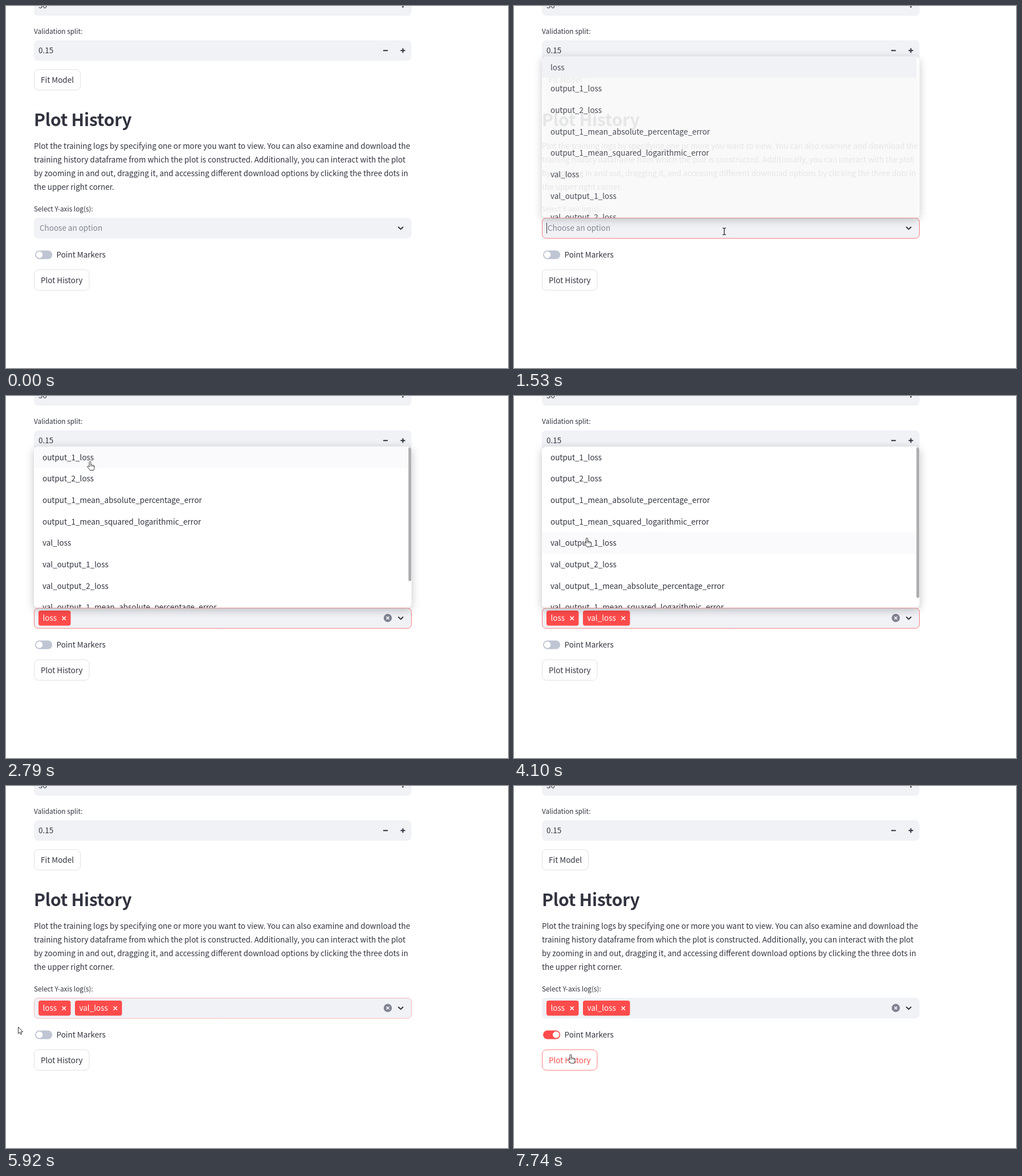
An HTML page with a canvas for the animation above (8000 ms loop, 881 by 636 pixels).

```html
<!DOCTYPE html>
<html lang="en">
<head>
<meta charset="utf-8">
<title>Plot History</title>
<style>
  html, body { margin: 0; width: 100%; height: 100%; overflow: hidden; background: #fff; }
  canvas { display: block; }
</style>
</head>
<body>
<canvas id="stage" width="881" height="636"></canvas>
<script>
const ctx = document.getElementById("stage").getContext("2d");
const LOOP = 8000;
const FAMILY = '"Noto Sans CJK SC", "Noto Sans CJK JP", "Noto Sans CJK", "Noto Sans", sans-serif';
const BODY = 13.48, LABEL = 11.8;
const INK = "#31333f", RED = "#ff4b4b", FIELD = "#f0f2f6", HOVER = "#fafafc";
const PANEL = { x: 49, y: 88.7, w: 662.7, h: 283.5, row: 37.65 };
const OPTIONS = ["loss", "output_1_loss", "output_2_loss",
  "output_1_mean_absolute_percentage_error", "output_1_mean_squared_logarithmic_error",
  "val_loss", "val_output_1_loss", "val_output_2_loss",
  "val_output_1_mean_absolute_percentage_error", "val_output_1_mean_squared_logarithmic_error"];
const INTRO = [
  "Plot the training logs by specifying one or more you want to view. You can also examine and download the",
  "training history dataframe from which the plot is constructed. Additionally, you can interact with the plot",
  "by zooming in and out, dragging it, and accessing different download options by clicking the three dots in",
  "the upper right corner."];

// Pointer moves: start, end, from x, from y, to x, to y
const MOVES = [
  [190, 990, 819, 624, 415, 424],
  [990, 1270, 415, 424, 369, 396],
  [1560, 2270, 369, 396, 147, 113],
  [2470, 2790, 147, 113, 147.5, 115.5],
  [3000, 3760, 147.5, 115.5, 128, 250],
  [4430, 4560, 128, 250, 128, 268],
  [4770, 5580, 128, 268, 21, 423],
  [6070, 6460, 21, 423, 74.5, 438.5],
  [7270, 7740, 74.5, 438.5, 99.5, 472]];
const PRESSES = [[1330, 1470], [2330, 2470], [3960, 4100], [5850, 5920], [6660, 6800]];

const HAND = new Path2D("M-1.4 9V1Q-1.4-.5 0-.5Q1.4-.5 1.4 1V6Q2.8 4.8 3.9 6.3Q5.4 5.2 6 6.8Q7.6 6.2 7.6 8.2V11Q7.4 13 6.3 15H0Q-1.5 12.5-4.2 9.8Q-5.4 8-4 7.6Q-2.6 7.6-1.4 9Z");
const ARROW = new Path2D("M.5.5V12L3.2 9.6L5 13.6L6.8 12.8L5.1 8.9H8.6Z");
const IBEAM = new Path2D("M-3-6Q-.3-6 0-5Q.3-6 3-6M0-5V5M-3 6Q-.3 6 0 5Q.3 6 3 6");

const clamp = v => Math.max(0, Math.min(1, v));
const ramp = (t, a, b) => clamp((t - a) / (b - a));
const between = (t, a, b) => t >= a && t < b;

function text(str, x, y, color = INK, size = BODY, weight = 400) {
  ctx.font = `${weight} ${size}px ${FAMILY}`;
  ctx.fillStyle = color;
  ctx.fillText(str, x, y);
}

function box(x, y, w, h, r, fill, border) {
  ctx.beginPath();
  ctx.roundRect(x, y, w, h, r);
  if (fill) { ctx.fillStyle = fill; ctx.fill(); }
  if (border) { ctx.strokeStyle = border; ctx.lineWidth = 1; ctx.stroke(); }
}

function disc(x, y, r, fill) {
  ctx.beginPath();
  ctx.arc(x, y, r, 0, Math.PI * 2);
  ctx.fillStyle = fill;
  ctx.fill();
}

function lines(path, color, width) {
  ctx.strokeStyle = color;
  ctx.lineWidth = width;
  ctx.stroke(new Path2D(path));
}

const cross = (x, y, r, color, width) =>
  lines(`M${x - r} ${y - r}l${2 * r} ${2 * r}m0 ${-2 * r}l${-2 * r} ${2 * r}`, color, width);

function numberField(value, cy) {
  box(49, cy - 18, 662.5, 36, 7.5, FIELD);
  text(value, 57, cy + 5.2);
  lines(`M662 ${cy}h8M692.5 ${cy}h8m-4 -4v8`, INK, 2);
}

function button(label, y, w, hot) {
  box(49.5, y, w, 36, 7.5, "#fff", hot ? "#ff8080" : "#e0e1e5");
  text(label, 61, y + 23.3, hot ? RED : INK);
}

function tag(label, x, w) {
  box(x, 377, w, 26.5, 4, RED);
  text(label, x + 7.5, 395.2, "#fff");
  cross(x + w - 11.7, 390.5, 3.2, "#fff", 1.6);
}

function pointerAt(t) {
  let pos = { x: 0, y: 0 };
  for (const [start, end, x0, y0, x1, y1] of MOVES) {
    if (t < start) break;
    const left = 1 - ramp(t, start, end), p = 1 - left * left;
    pos = { x: x0 + (x1 - x0) * p, y: y0 + (y1 - y0) * p };
  }
  return pos;
}

function drawSelect(t, picked) {
  box(49, 372, 662.7, 36.5, 7.5, FIELD);
  const focus = t < 5850 ? ramp(t, 1400, 1530) * (t >= 1470)
    : t < 5920 ? 1 : t < 5990 ? 0.5 : 0;
  if (focus) box(49.5, 372.5, 662, 35.7, 7, null, `rgba(255,75,75,${0.7 * focus})`);
  if (picked === 0) {
    text("Choose an option", 59, 395.3, "#838590");
    if (between(t, 1470, 2000)) lines("M57.5 381v18.5", INK, 1);
  } else {
    tag("loss", 57, 56.5);
    if (picked === 2) tag("val_loss", 121, 82.5);
    disc(670, 390, 7.2, "#7f8290");
    cross(670, 390, 2.5, "#fff", 1.5);
  }
  lines("M688.3 388l4.4 4.2l4.4 -4.2", INK, 2);
}

function drawPanel(t, picked, pointer, inside) {
  const { x, y, w, h, row } = PANEL;
  const chosen = ["loss", "val_loss"].slice(0, picked);
  const items = OPTIONS.filter(name => !chosen.includes(name));
  const active = inside ? Math.floor((pointer.y - y) / row) : t < 3000 ? 0 : 7;
  const justPicked = between(t, 2470, 3050) || between(t, 4100, 4800);

  ctx.save();
  ctx.globalAlpha = ramp(t, 1455, 1540);
  ctx.save();
  ctx.shadowColor = "rgba(0,0,0,.24)";
  ctx.shadowBlur = 15;
  ctx.shadowOffsetY = 3.5;
  box(x, y, w, h, 7.5, "#fff");
  ctx.restore();
  box(x, y, w, h, 7.5);
  ctx.clip();
  ctx.fillStyle = justPicked ? HOVER : FIELD;
  ctx.fillRect(x, y + active * row, 657, row);
  items.forEach((name, i) => text(name, 64, y + (i + 0.5) * row + 5.3));
  if (inside) box(706.3, 90, 5, h * h / (items.length * row) - 2, 2.5, "#adadb0");
  ctx.restore();
}

function drawToggle(t, hot) {
  const on = t >= 6800;
  box(51, 429.5, 30.2, 15.2, 7.6, on ? RED : hot ? "#a3a8b8" : "#bfc5d3");
  disc(58.6 + 15.2 * ramp(t, 6770, 6930), 437, 5.8, "#fff");
  text("Point Markers", 88.5, 441.6);
}

function drawPointer(t, pointer, kind) {
  if (PRESSES.some(([a, b]) => between(t, a, b))) disc(pointer.x, pointer.y, 10.5, "rgba(255,255,0,.47)");
  ctx.save();
  ctx.translate(pointer.x, pointer.y);
  ctx.lineJoin = "round";
  if (kind === "text") {
    ctx.strokeStyle = "#111";
    ctx.lineWidth = 1.2;
    ctx.stroke(IBEAM);
  } else {
    const shape = kind === "hand" ? HAND : ARROW;
    ctx.fillStyle = "#fff";
    ctx.fill(shape);
    ctx.strokeStyle = "#333";
    ctx.lineWidth = 1;
    ctx.stroke(shape);
    if (kind === "hand") {
      ctx.lineWidth = 0.7;
      ctx.stroke(new Path2D("M1.4 6v3M3.9 6.3v2.7M6 6.8v2.4"));
    }
  }
  ctx.restore();
}

function draw(t) {
  const pointer = pointerAt(t);
  const visible = t >= 190, open = between(t, 1470, 5920);
  const within = (x0, y0, x1, y1) => visible &&
    pointer.x >= x0 && pointer.x < x1 && pointer.y >= y0 && pointer.y < y1;
  const inPanel = open && within(49, 88.7, 711.7, 372.2);
  const onToggle = within(49, 423.5, 711, 449);
  const onButton = within(49, 463, 146.5, 500);
  const picked = t < 2470 ? 0 : t < 4100 ? 1 : 2;

  ctx.fillStyle = "#fff";
  ctx.fillRect(0, 0, 881, 636);
  numberField("30", -0.9);
  text("Validation split:", 49, 49, INK, LABEL);
  numberField("0.15", 78.2);
  button("Fit Model", 111.7, 81);

  ctx.letterSpacing = "-0.25px";
  text("Plot History", 49, 210.7, INK, 30, 600);
  ctx.letterSpacing = "0px";
  INTRO.forEach((line, i) => text(line, 49, 251 + 24.1 * i));

  text("Select Y-axis log(s):", 49, 361.2, INK, LABEL);
  drawSelect(t, picked);
  drawToggle(t, onToggle);
  button("Plot History", 463.4, 96.5, onButton);
  if (open) drawPanel(t, picked, pointer, inPanel);

  if (visible) {
    const onLabel = onToggle && pointer.x < 176;
    const kind = inPanel || onLabel || onButton ? "hand"
      : within(49, 372, 711, 408) ? "text" : "arrow";
    drawPointer(t, pointer, kind);
  }
}

let began;
function tick(now) {
  began ??= now;
  draw((now - began) % LOOP);
  requestAnimationFrame(tick);
}
requestAnimationFrame(tick);
</script>
</body>
</html>
```
